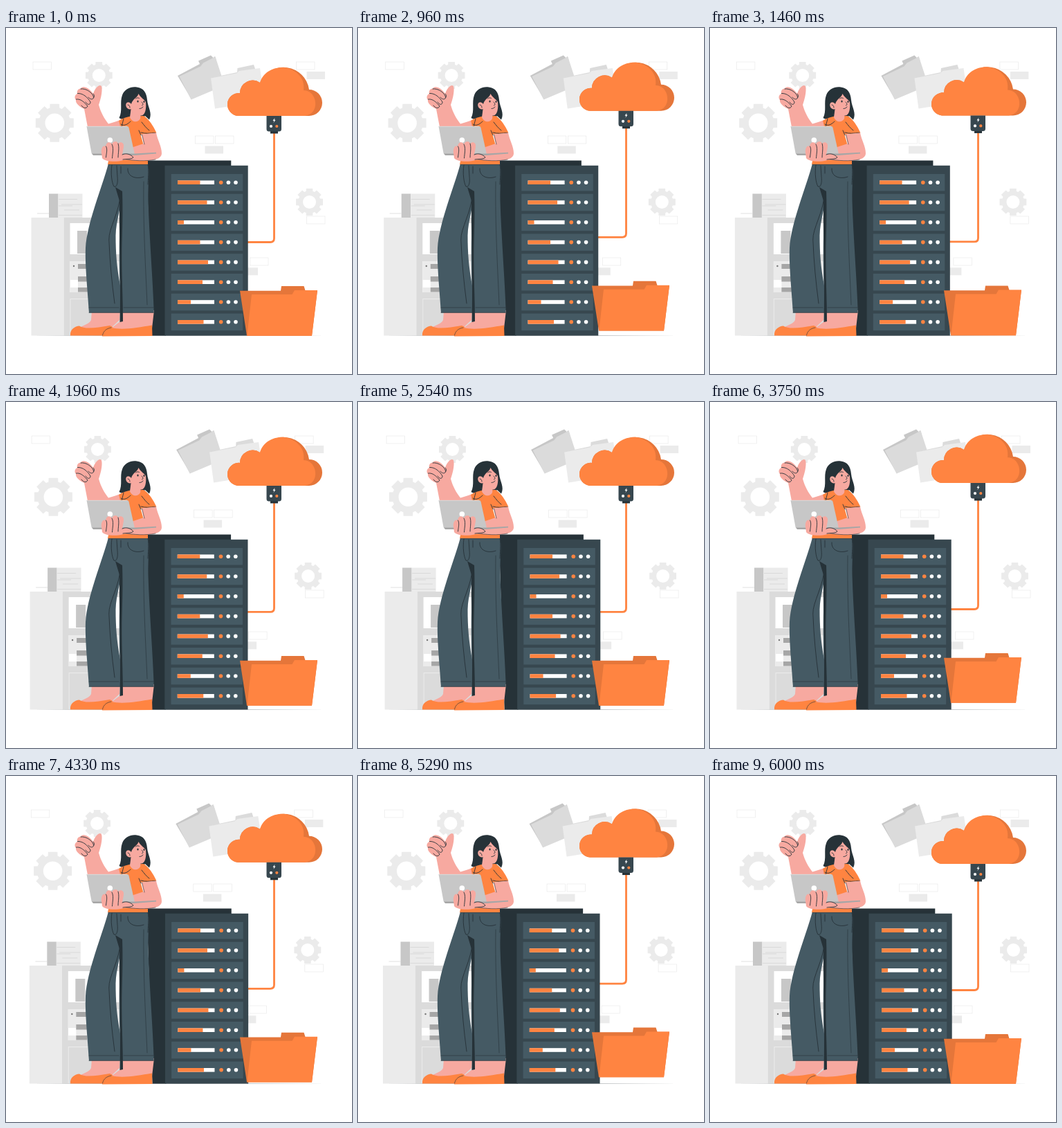
An HTML page for the animation above (6040 ms loop, 500 px wide and 500 px high).

```html
<!DOCTYPE html>
<html lang="en">
<head>
<meta charset="utf-8">
<title>Cloud hosting</title>
<style>
  html, body { margin: 0; width: 100%; height: 100%; overflow: hidden; background: #fff; }
  svg { display: block; width: 100vw; height: 100vh; }
  .line { fill: none; stroke: #263238; stroke-width: .9; stroke-linecap: round; stroke-linejoin: round; }
  .thin { stroke-width: .6; }
  .box { fill: none; stroke: #e6e6e6; stroke-width: .6; }
  .pale { fill: #ebebeb; }
  .soft { fill: #dbdbdb; }
  .grey { fill: #c7c7c7; }
  .dim { fill: #a6a6a6; }
  .ink { fill: #263238; }
  .slate { fill: #455a64; }
  .steel { fill: #37474f; }
  .skin { fill: #f7a9a0; }
  .orange { fill: #ff8441; }
  .rust { fill: #e5763a; }
  .white { fill: #fff; }
</style>
</head>
<body>
<svg viewBox="0 0 500 500" xmlns="http://www.w3.org/2000/svg">
  <g id="backdrop">
    <g id="gears" class="pale" fill-rule="evenodd"></g>
    <g id="boxes"></g>

    <!-- folders in the air -->
    <path class="grey" d="M248 69 L280 52 L278 47.500 L296 39.500 L299.500 43 L302 41 L304 47 L268 103Z"/>
    <path class="soft" d="M250.500 70 L281 55.500 L285 50.500 L302.500 41.500 L316 83 L267.500 103.500Z"/>
    <path class="soft" d="M296 72 L334 64 L334.500 58 L358 53 L360 59 L366 60 L364 75 L303 110Z"/>
    <path class="pale" d="M296 72.500 L333 65.500 L337 62 L367 58 L374 105 L302 116.500Z"/>

    <!-- cabinet -->
    <path class="pale" d="M36.500 274 H83.500 V444.500 H36.500Z"/>
    <path class="soft" d="M83.500 274 H172 V444.500 H83.500Z"/>
    <path class="white" d="M92.500 282 H166 V327 H92.500Z M92.500 337 H166 V382 H92.500Z"/>
    <path class="pale" d="M92.500 391 H166 V444 H92.500Z M92.500 337 H104 V364 H92.500Z M104 337 H166 V382 H104Z M92.500 375 H104 V382 H92.500Z"/>
    <path class="soft" d="M93.500 392 H166 V444 H93.500Z"/>
    <path class="grey" d="M103 293 H117 V326 H103Z"/>
    <path class="dim" d="M104 341 H120 V348 H104Z M104 359 H120 V366.500 H104Z M104 375 H120 V381.500 H104Z"/>
    <circle cx="98" cy="344" r="1.200" fill="#777"/>
    <path class="grey" d="M62 239.500 H75.500 V274 H62Z"/>
    <path class="pale" d="M75.500 239.500 H110.500 V274 H75.500Z"/>
    <path fill="none" stroke="#cfcfcf" stroke-width=".6" d="M76 247.500 H103 M80 255 H110 M76 257 H96 M84 263 H106 M76 270.500 H110 M45 268 H62"/>
  </g>

  <path class="ink" d="M36 444.500 L250 444.200 L463 444.500 L250 444.800Z"/>

  <g class="float">
    <path fill="none" stroke="#ff8441" stroke-width="2.800" d="M387.500 152 V304 Q387.500 309.500 382 309.500 H340"/>
    <path class="rust" d="M335 127 A16.400 16.400 0 0 1 338 94 A18.500 18.500 0 0 1 367 79 A37.300 37.300 0 0 1 438 89 A19 19 0 0 1 438 127Z"/>
    <path class="orange" d="M335 127 A16.400 16.400 0 0 1 338 94 A18.500 18.500 0 0 1 367 79 C371 65 385 56 402 57 C417 59 433 71 430 90 C450 90 455 124 432 127Z"/>
    <path class="ink" d="M382 149 H393 V152.500 H382Z"/>
    <path class="steel" d="M376.500 127 H398 V146 Q398 149.500 394.500 149.500 H380 Q376.500 149.500 376.500 146Z"/>
    <path class="white" d="M388.500 130 L385.500 134 H387.300 L386.500 137 L389.600 132.800 H387.800Z"/>
    <circle class="white" cx="383" cy="142" r="2.100"/>
    <circle class="orange" cx="391.300" cy="142" r="2.100"/>
  </g>

  <g id="server">
    <path class="ink" d="M203 191.500 H325.300 V199 H231 V444.500 H211Z"/>
    <path class="steel" d="M229.500 198.700 H349.700 V444.500 H229.500Z"/>
  </g>

  <g class="float">
    <path class="rust" d="M338 379.800 H397 L398 373 H430.500 L432.500 379.300 H450 L442 444.800 H348Z"/>
    <path class="orange" d="M355 385 H413.500 L417 379 H450 L442 444.800 H348.300Z"/>
  </g>

  <g id="woman">
    <!-- feet -->
    <path class="skin" d="M124 408 H165 L164 422 L151 434 L104 436 C106 430 119 430 123 422Z"/>
    <path class="orange" d="M93 444.500 C92 435 100 431 106 430.500 C114 436 132 433 150 430 L158 434 L148 444.500Z"/>
    <path class="skin" d="M168 408 H214 L211 434 L150 437 C154 431 162 427 168 422Z"/>
    <path class="orange" d="M139 445.500 C140 436 147 433.500 152 433 C168 437 190 433 211 429.500 L211.500 445Z"/>
    <path class="line thin" d="M139.500 444 C141 437 146 434 152 433"/>

    <!-- trousers -->
    <path class="slate" d="M148 196 H185 L168 236 C167 258 159 278 158.500 300 C158.500 325 160 345 165 372 V411.500 H120 C118 380 114 342 115 318 C117 282 139 230 148 196Z"/>
    <path class="slate" d="M159 196 H205 C208 206 205 225 205.500 250 C207 300 212 360 213.800 411.500 H166 C164 370 163 320 164.500 290 L168 236 L159 231Z"/>
    <path class="line" d="M165 240 C165 264 148 290 148.800 306 C150 338 153 368 157 398 M148 197 H205 C207 206 205 220 205 226 M153 198 C151 210 153 224 156 229 C160 231 162 224 161 215 L160 199 M176 203 C175 215 188 219 199 215 M166 200 V210"/>
    <path class="line thin" d="M120 404 H163 M170 404 H213 M199 222 C198 285 202 350 204 400 M120 411.300 H165 M169 411.300 H213"/>
    <path class="ink" d="M158 230 L168 236 C169 265 168 290 167.300 320 C167 360 169 390 169 424 L164.500 425 C166.500 360 163 290 164 250Z"/>

    <!-- raised arm -->
    <path class="skin" d="M170 131 C163 134 156 136 148 138.500 C142 131 137 122 134 111 C138 100 140 87 137.500 83.500 C134 81 128 88 126 95 C121 87 111 82 108 87.500 C104 88 102 91 103 95 C99 97 98.500 101 101 104 C100 109 107 114 113 117 L118 143 L168 150Z"/>
    <path class="line" d="M108 88 C115 87 123 92 126 98 C128 103 123 105 119 100 M103.500 94.500 C111 94 118 100 122 107 C122 111 118 112 115 107 M101.500 103 C108 102 113 107 118 113 C116 117 112 116 109 112 M126 95 C128 97 128 99 126.500 101"/>

    <!-- hair, neck, shirt -->
    <path class="ink" d="M163.500 130 C169 120 164 107 168 97 C171 88 181 84 189 85.500 C199 87 203 93 204 104 C205 115 212 123 207 132.500 L201 127 L196 131 L182 131 C176 132.500 168 133 163.500 130Z"/>
    <path class="orange" d="M163 134 C169 130 176 128 181 127.500 L199 127 C207 132 213 142 217.500 151.500 L194.500 154 L199 170 L205 184 V197 H147 L150 182 L166 146Z"/>
    <path class="skin" d="M181 114 L195 121 L194 131 C190 138 182 136 179 129Z"/>

    <!-- face -->
    <path class="skin" d="M181 110 C183 102 190 101 191.500 95 C194 100 200 103 202 107 C203 116 201.500 126 195.500 126.500 C189 127 183 122 181 117 C177 119 172 114 173.500 109.500 C175 106 179 107 181 110Z"/>
    <path class="line" d="M176 111 C178 111 179 113 179 115 M196 107 C198 109 199 111 196.500 112 M193 116.500 C195 116.500 197 115.500 198 114 M187.500 102 C189 100.500 191 100.500 192.500 101.500 M198 102 C199 101 200.500 101.500 201.500 102.500"/>
    <ellipse class="ink" cx="190.500" cy="106" rx="1.100" ry="1.600"/>
    <ellipse class="ink" cx="199.500" cy="106.500" rx="1" ry="1.500"/>
    <path class="line" d="M166 139 C170 142 175 140 180 135 M196 136 C200 141 203 145 207 148 M192 148 L195 155 M195 151 C201 153 208 152 216 151.500 M170 131 L167 143"/>

    <!-- resting arm -->
    <path class="skin" d="M196 153.700 L217 151.500 C219 162 225 171 225 181 C225 190 212 191 204 191.500 C192 193 180 191 169 190 L171 180 L184 172 L199 167Z"/>
    <path class="line thin" d="M196.500 154 C198 160 199 164 200 168 M169 189 C185 192 202 193 216 190"/>

    <!-- laptop -->
    <path class="grey" d="M116.500 142 H175 Q177 142 177.500 144 L186 182.500 H126 Q124 182.500 123.500 180.500Z"/>
    <path class="dim" d="M124 181.500 H186 L217 179.800 V181.500 L186 184 H126Z"/>
    <path fill="none" stroke="#e0e0e0" stroke-width=".8" d="M117 142.300 H175"/>
    <circle class="white" cx="150.300" cy="162" r="3.800"/>

    <!-- holding hand -->
    <path class="skin" d="M138 181 C137 174 140 169 144 171 C145 164 151 164 153 168 C155 163 161 163 162 167 C166 163 171 166 170 172 L168 183 C174 180 181 183 184 187 C181 191 174 189 168 191.500 C158 194 143 193 139 188Z"/>
    <path class="line" d="M144.500 171 C147 175 145 181 144.500 187 M153 168 C156 173 154 181 153.500 188 M162 167 C164 173 162 181 162 187 M168 183 C174 180 181 183 184 187 C181 190 174 189 169 190"/>
  </g>
</svg>

<script>
const $ = id => document.getElementById(id);

function add(parent, tag, attrs) {
  const node = document.createElementNS('http://www.w3.org/2000/svg', tag);
  for (const key in attrs) node.setAttribute(key, attrs[key]);
  parent.appendChild(node);
}

// Eight-toothed wheel with a round hole.
function gear(cx, cy, r, hole) {
  const pts = [];
  for (let i = 0; i < 8; i++) {
    for (const [turn, k] of [[-.31, .81], [-.24, 1], [.24, 1], [.31, .81]]) {
      const a = i * Math.PI / 4 + turn;
      pts.push((cx + Math.sin(a) * r * k).toFixed(2) + ' ' + (cy - Math.cos(a) * r * k).toFixed(2));
    }
  }
  const ring = `M${cx - hole} ${cy} a${hole} ${hole} 0 1 0 ${2 * hole} 0 a${hole} ${hole} 0 1 0 ${-2 * hole} 0Z`;
  add($('gears'), 'path', { d: `M${pts.join('L')}Z${ring}` });
}
gear(70.3, 137.3, 28.3, 13.8);
gear(134.3, 68.5, 20, 9.5);
gear(438.5, 251.5, 20, 9.5);

const box = (x, y, kind) =>
  add($('boxes'), 'rect', { x, y, width: 26.5, height: 11, class: kind });
for (const [x, y] of [[39, 49], [419.5, 49], [273.5, 156], [302.5, 156], [434.5, 272], [352.5, 332]]) box(x, y, 'box');
for (const [x, y] of [[434.5, 63], [287.5, 170.5], [337.5, 346.3]]) box(x, y, 'pale');

// Server bays: progress in pixels for each row.
[32.5, 42.5, 9, 32.5, 44, 36, 19, 37.5].forEach((fill, row) => {
  const y = 211 + row * 28.8;
  const rack = $('server');
  add(rack, 'rect', { x: 238.7, y, width: 103.5, height: 24.5, class: 'slate' });
  add(rack, 'rect', { x: 248, y: y + 9.4, width: 53, height: 5.6, class: 'white' });
  add(rack, 'rect', { x: 248, y: y + 9.4, width: fill, height: 5.6, class: 'orange' });
  [310.7, 321.4, 332].forEach((cx, i) =>
    add(rack, 'circle', { cx, cy: y + 12.2, r: 2.8, class: i ? 'white' : 'orange' }));
});

// Offsets at every tenth of a period.
const SHAKE = [0, -1, 2, -4, 4, -4, 4, -4, 2, -1, 0];
const LOOP = 6040, FPS = 24;

function shake(t, period) {
  const p = t % period / period * 10;
  const i = Math.floor(p);
  return SHAKE[i] + (SHAKE[i + 1] - SHAKE[i]) * (p - i);
}

function float(t, period) {
  const p = t % period / period;
  return -10 * (1 - Math.abs(2 * p - 1));
}

const move = (node, x, y) => node.setAttribute('transform', `translate(${x.toFixed(3)} ${y.toFixed(3)})`);
const floats = document.querySelectorAll('.float');

function draw(ms) {
  const t = Math.floor((ms % LOOP + 4.9) * FPS / 1000) / FPS;
  move($('backdrop'), shake(t, 6), 0);
  move($('server'), shake(t, 3), 0);
  floats.forEach(node => move(node, 0, float(t, 1.5)));
}

const start = performance.now();
function tick() {
  draw(performance.now() - start);
  requestAnimationFrame(tick);
}
tick();
</script>
</body>
</html>
```
